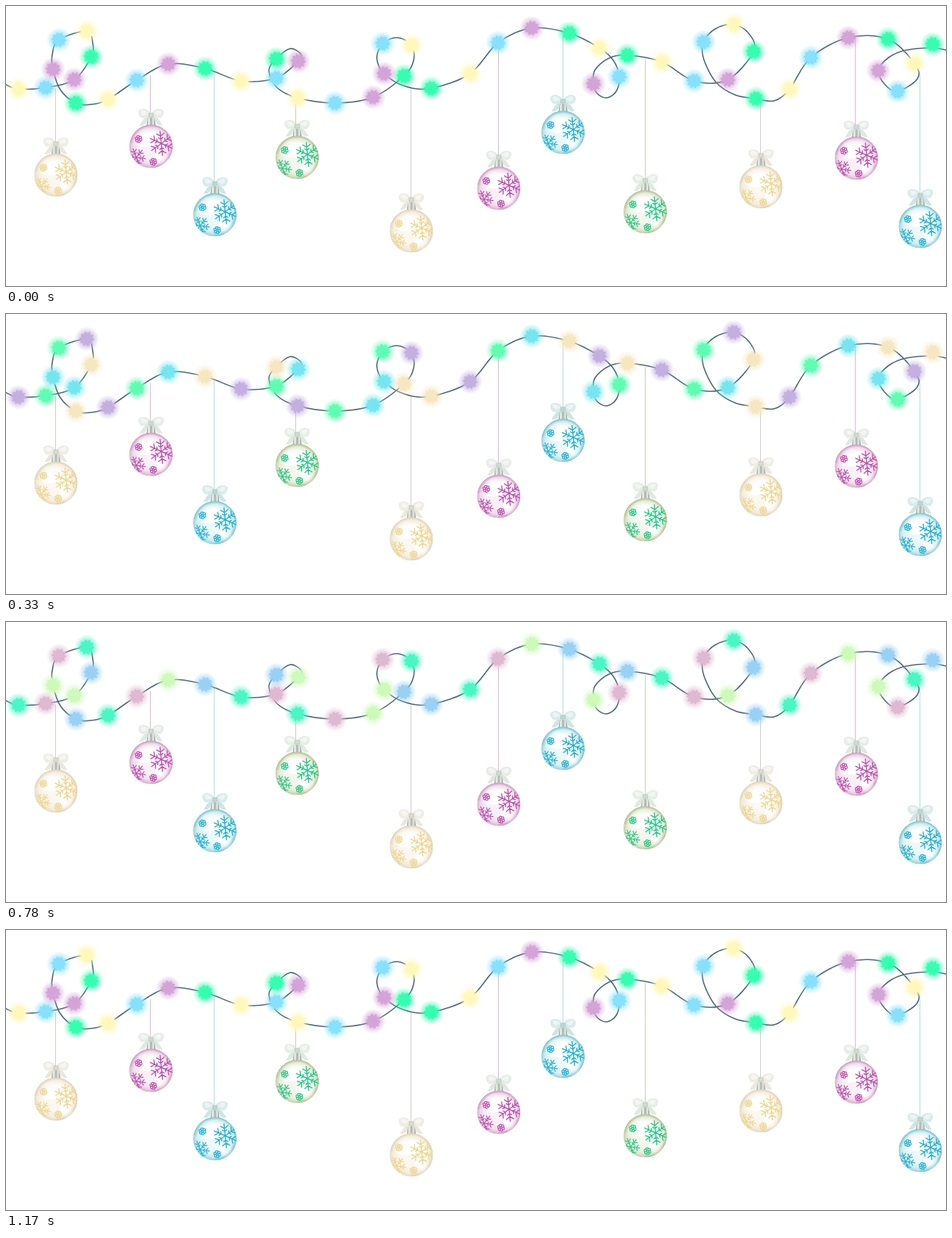
An HTML page with a canvas for the animation above (1.2 s loop, 1280 px wide and 381 px high).

```html
<!DOCTYPE html>
<html lang="en">
<head>
<meta charset="utf-8">
<title>Garland</title>
<style>
  html, body { margin: 0; width: 100%; height: 100%; overflow: hidden; background: #fff; }
  canvas { display: block; width: 100vw; height: 100vh; }
</style>
</head>
<body>
<canvas id="stage" width="1280" height="381"></canvas>
<script>
const W = 1280, H = 381, LOOP = 1200, STEP = 30;
const view = document.getElementById('stage').getContext('2d');
const backdrop = document.createElement('canvas');
backdrop.width = W;
backdrop.height = H;
const g = backdrop.getContext('2d');

// Lamps in the order they sit on the wire.
const lamps = [
  [17,113],[54,111],[93,100],[116,69],[110,34],[72,46],[64,86],[95,132],
  [139,127],[178,101],[221,79],[271,85],[320,102],[368,98],[398,75],[368,72],
  [397,125],[448,132],[500,124],[542,95],[552,53],[513,51],[515,92],[579,112],
  [632,92],[670,50],[716,30],[767,37],[808,57],[835,96],[800,106],[846,67],
  [893,76],[937,102],[983,100],[1018,62],[991,25],[950,49],[1021,126],
  [1067,113],[1096,70],[1147,43],[1201,45],[1237,78],[1214,116],[1188,88],[1262,52]
];

// Extra wire bends, keyed by the lamp they follow.
const bends = {
  3: [[118,50]], 5: [[63,66]], 6: [[74,114]], 7: [[115,134]],
  14: [[402,66],[387,58]], 15: [[358,88],[369,111]],
  19: [[555,74]], 20: [[533,43]], 21: [[505,71]], 22: [[543,109]],
  28: [[827,74]], 29: [[831,116],[818,125],[805,119]], 30: [[802,87],[821,71]],
  35: [[1012,38]], 36: [[966,31]], 37: [[950,72],[967,104],[993,121]], 38: [[1046,129]],
  43: [[1241,99]], 44: [[1197,107]], 45: [[1202,70],[1226,60]], 46: [[1280,60]]
};

const kinds = {
  Y: { flake: '#eed58a', edge: '#ddcfb8', tint: '#f6eedd', bow: '#e0dccb', line: '#d2cbc8' },
  P: { flake: '#c04cb0', edge: '#c993bd', tint: '#f0dcec', bow: '#cfdcd3', line: '#dcb6da' },
  B: { flake: '#1cb0da', edge: '#74bfc9', tint: '#d2eef0', bow: '#b4d9d9', line: '#b2dde1' },
  G: { flake: '#1fca83', edge: '#afba8d', tint: '#e6ecd6', bow: '#cde0cb', line: '#c9ceb4' }
};

// kind, ball centre, thread x, thread top
const balls = [
  ['Y', 68, 230, 67.5, 112], ['P', 197.5, 191, 196.5, 94], ['B', 284.5, 284, 283.5, 90],
  ['G', 396.5, 206, 394.5, 124], ['Y', 552, 306, 551.5, 111], ['P', 671, 248, 670.5, 52],
  ['B', 758.5, 172, 758.5, 36], ['G', 870.5, 280, 870.5, 72], ['Y', 1028, 246, 1027.5, 128],
  ['P', 1158, 207, 1156.5, 43], ['B', 1245, 300, 1244.5, 88]
];

function shape(fill, stroke, d) {
  const p = new Path2D(d);
  if (fill) { g.fillStyle = fill; g.fill(p); }
  if (stroke) { g.strokeStyle = stroke; g.stroke(p); }
}

function snowflake(x, y, r, turn) {
  g.save();
  g.translate(x, y);
  g.rotate(turn);
  g.beginPath();
  for (let i = 0; i < 6; i++) {
    g.moveTo(0, 0);
    g.lineTo(r, 0);
    for (const [at, len] of [[.35, .2], [.58, .32]]) {
      g.moveTo(r * (at + len * .7), -r * len);
      g.lineTo(r * at, 0);
      g.lineTo(r * (at + len * .7), r * len);
    }
    g.rotate(Math.PI / 3);
  }
  g.stroke();
  g.restore();
}

function rosette(x, y, r) {
  g.beginPath();
  for (let i = 0; i < 6; i++) {
    const a = i * Math.PI / 3 + .3, px = x + r * .6 * Math.cos(a), py = y + r * .6 * Math.sin(a);
    g.moveTo(px + r * .35, py);
    g.arc(px, py, r * .35, 0, 7);
  }
  g.stroke();
}

function spot(x, y, r, rgb, alpha) {
  const s = g.createRadialGradient(x, y, 0, x, y, r);
  s.addColorStop(0, `rgba(${rgb},${alpha})`);
  s.addColorStop(1, `rgba(${rgb},0)`);
  g.fillStyle = s;
  g.fillRect(-30, -30, 60, 60);
}

function bow(color) {
  g.lineWidth = .8;
  for (const side of [-1, 1]) {
    g.save();
    g.scale(side, 1);
    g.globalAlpha = .65;
    shape(color, color, 'M1-42 L9-38 L15-29 L11-29 L8-31 L3-38Z');
    g.globalAlpha = .5;
    shape(color, color, 'M0-44 C4-51 12-52 16-49 C18-46 16-41 13-39 C9-39 4-41 0-43Z');
    shape('#fff', null, 'M4-45 C8-49 12-50 14-48 C14-45 12-43 10-42Z');
    g.globalAlpha = 1;
    g.restore();
  }
  shape(color, '#b9c5ba', 'M-3-45 H3 V-40 H-3Z');
}

function ornament([kind, x, y, lineX, top]) {
  const c = kinds[kind], R = 29.5;
  g.fillStyle = c.line;
  g.fillRect(lineX - .5, top, 1, y - 44 - top);
  g.save();
  g.translate(x, y);

  const metal = g.createLinearGradient(-6, 0, 6, 0);
  ['#879187', '#f4f5f2', '#a9b0a9', '#e9ece8', '#7d867f']
    .forEach((m, i) => metal.addColorStop(i / 4, m));
  shape(metal, null, 'M-5-38 Q0-41 5-38 L6-28 H-6Z');
  bow(c.bow);

  g.save();
  g.beginPath();
  g.arc(0, 0, R, 0, 7);
  g.clip();
  const body = g.createRadialGradient(2, -3, 8, 0, 0, R);
  body.addColorStop(0, '#fff');
  body.addColorStop(.45, '#fcfbfa');
  body.addColorStop(.78, c.tint);
  body.addColorStop(1, c.edge);
  g.fillStyle = body;
  g.fillRect(-R, -R, 2 * R, 2 * R);
  g.globalAlpha = .4;
  shape(c.tint, null, 'M-30-6 Q-8 5 4-2 Q10 12-2 30 H-30Z');
  g.globalAlpha = 1;
  spot(-8, -12, 14, '255,255,255', .9);
  spot(13, 15, 12, '255,255,255', .9);

  g.strokeStyle = c.flake;
  g.lineWidth = 1.4;
  snowflake(14, -4, 17, .42);
  g.lineWidth = 1.2;
  snowflake(-20, 15, 13, .15);
  rosette(-17, -10, 5);
  rosette(3, 21, 5);
  g.restore();
  g.restore();
}

function wire() {
  const pts = [[0, 107]];
  lamps.forEach((p, i) => pts.push(...(i === lamps.length - 1 ? [[1262, 57]] : [p]), ...(bends[i] || [])));
  const at = i => pts[Math.max(0, Math.min(pts.length - 1, i))];
  g.beginPath();
  g.moveTo(...pts[0]);
  for (let i = 0; i < pts.length - 1; i++) {
    const [a, b, c, d] = [at(i - 1), at(i), at(i + 1), at(i + 2)];
    g.bezierCurveTo(
      b[0] + (c[0] - a[0]) / 6, b[1] + (c[1] - a[1]) / 6,
      c[0] - (d[0] - b[0]) / 6, c[1] - (d[1] - b[1]) / 6, c[0], c[1]);
  }
  g.strokeStyle = '#47687c';
  g.lineWidth = 1.6;
  g.stroke();
}

balls.forEach(ornament);
wire();

const cycle = [[255,248,186], [212,164,216], [134,224,255], [52,255,176]];
const starts = [0, 2, 1, 3];
const star = new Path2D();
for (let i = 0; i < 20; i++) {
  const a = i * Math.PI / 10 + .1, r = i % 2 ? 7.6 : 10.8;
  star.lineTo(r * Math.cos(a), r * Math.sin(a));
}
star.closePath();

function mix(phase) {
  const i = Math.floor(phase), f = phase - i;
  const a = cycle[i % 4], b = cycle[(i + 1) % 4];
  return a.map((v, k) => Math.round(v + (b[k] - v) * f)).join();
}

function lamp(x, y, rgb) {
  view.save();
  view.translate(x, y);
  const halo = view.createRadialGradient(0, 0, 7, 0, 0, 17);
  halo.addColorStop(0, `rgba(${rgb},.8)`);
  halo.addColorStop(.45, `rgba(${rgb},.42)`);
  halo.addColorStop(1, `rgba(${rgb},0)`);
  view.fillStyle = halo;
  view.fillRect(-17, -17, 34, 34);
  view.fillStyle = `rgb(${rgb})`;
  view.fill(star);
  view.restore();
}

function draw(now) {
  const t = Math.floor(now % LOOP / STEP) * STEP;
  const u = t / (LOOP - STEP);
  const phase = 4 * u + .1 * Math.sin(Math.PI * u);
  const colors = starts.map(s => mix(phase + s));
  view.fillStyle = '#fff';
  view.fillRect(0, 0, W, H);
  view.drawImage(backdrop, 0, 0);
  // The colour order skips one place after the large right-hand loop.
  lamps.forEach(([x, y], i) => lamp(x, y, colors[(i + (i > 37)) % 4]));
}

const begin = performance.now();
function tick() {
  draw(performance.now() - begin);
  requestAnimationFrame(tick);
}
tick();
</script>
</body>
</html>
```
